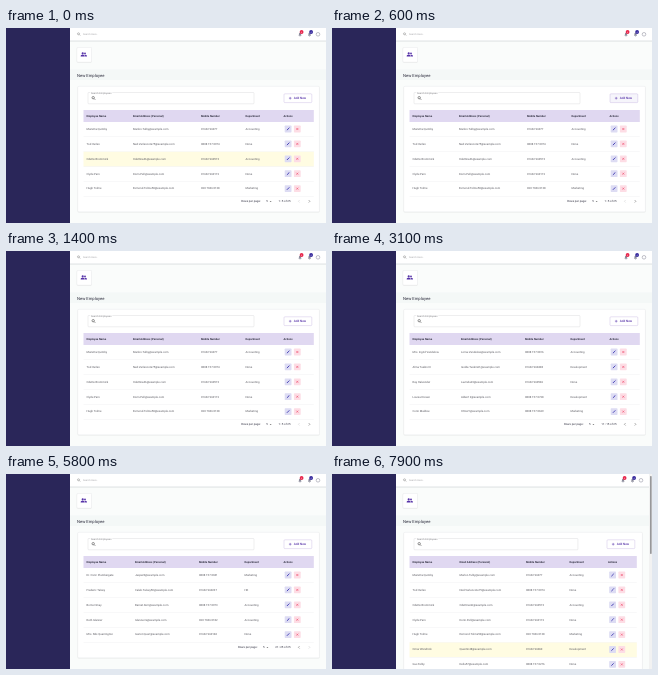
These frames come from a looping animation (320x195 px, 8000 ms). An HTML page:

```html
<!DOCTYPE html>
<html lang="en">
<head>
<meta charset="utf-8">
<title>Employee list</title>
<style>
html, body { margin: 0; width: 100%; height: 100%; overflow: hidden; background: #fafcfb; }
svg { display: block; width: 100vw; height: 100vh; }
text { font-family: Roboto, Arial, sans-serif; text-rendering: geometricPrecision; white-space: pre; }
</style>
</head>
<body>
<svg id="stage" viewBox="0 0 320 195"></svg>
<script>
const LOOP = 8000, ROW_H = 14.9, TOP = 94;
const INK = '#55555c', DARK = '#29293a', PURPLE = '#5632a8', NAVY = '#2a2659';

// name | mailbox | phone | department
const people = `Marietta Quimby|Marlon.Tulby|01632 96077|Accounting
Tod Varlen|Ned.Varlencote75|0808 157 0974|None
Odette Brommick|Odettine46|01632 960573|Accounting
Clyde Parn|Dorin.Pell|01632 960172|None
Hugh Tolme|Esmond.Tolme50|020 7946 0138|Marketing
Omar Wendrick|Quentin48|01632 96060|Development
Gus Felby|Della57|0808 157 0276|None
Nora Quillam|Nora.Quillam8|01632 960418|Marketing
Miles Trandor|Trandor31|0808 157 0265|HR
Edna Corvish|Edna.Corvish|01632 960844|Accounting
Mrs. Ingrid Vandelow|Lorna.Vandelow|0808 157 0816|Accounting
Alma Tuskin III|Isolde.Tuskin61|01632 960408|Development
Ray Halvender|Lavinda23|01632 960506|None
Louisa Dreven|Alden12|0808 157 0728|Development
Corin Maldow|Ottis21|0808 157 0629|Marketing
Lou Ebb|Jolanda89|020 7946 0935|Development
Ivy Tarnel|Oliver.T60|0808 157 0143|Development
Rolf Wimberan|Leonie.Wimber48|0808 157 025|Development
Greta Moll DDS|Humbert.Moll322|020 7946 0176|None
Matilda Vong|Brinna21|0808 157 0181|Accounting
Dr. Osric Plumbergate|Jasper8|0808 157 0941|Marketing
Frederic Talsey|Caleb.Talsey50|01632 960237|HR
Bo Kerrimay|Barnet.Kerr|0808 157 0973|Accounting
Ruth Glanner|Glanner.G|020 7946 0182|Accounting
Mrs. Nils Quarrington|Garret.Quarr|01632 960160|None`
  .split('\n').map(line => {
    const [name, box, phone, dept] = line.split('|');
    return [name, box + '@example.com', phone, dept];
  });

// left edges of the columns on each page, then with the scrollbar
const columns = [
  [80.5, 127, 195, 239.5, 277.5],
  [80.5, 128, 194, 239, 277.5],
  [80.5, 129, 193, 238.5, 277.5],
  [80.5, 128, 192, 238, 277.5],
  [80.5, 129, 193, 238.5, 277.5],
];
const narrowColumns = [80.5, 127.5, 194, 237.5, 276];

const rect = (x, y, w, h, fill, more = '') =>
  `<rect x="${x}" y="${y}" width="${w}" height="${h}" fill="${fill}" ${more}/>`;
const circle = (x, y, r, fill, more = '') =>
  `<circle cx="${x}" cy="${y}" r="${r}" fill="${fill}" ${more}/>`;
const line = (d, color, width = 0.5) =>
  `<path d="${d}" fill="none" stroke="${color}" stroke-width="${width}"/>`;
const shape = (d, fill) => `<path d="${d}" fill="${fill}"/>`;
const text = (x, y, str, size = 2.8, fill = INK, more = '') =>
  `<text x="${x}" y="${y}" font-size="${size}" fill="${fill}" ${more}>${str}</text>`;
const at = (x, y, body) => `<g transform="translate(${x} ${y})">${body}</g>`;
const shadowed = (x, y, w, h, r) =>
  rect(x - 0.5, y - 0.2, w + 1, h + 1.1, '#000', `rx="${r + 0.4}" opacity=".05"`) +
  rect(x, y, w, h, '#fff', `rx="${r}" stroke="#e6e8ea" stroke-width=".3"`);
const lens = (x, y, r, color) =>
  circle(x, y, r, 'none', `stroke="${color}" stroke-width="${r * 0.4}"`) +
  line(`M${x + r * 0.7} ${y + r * 0.7}l${r} ${r}`, color, r * 0.45);

// rises from 0 to 1 in n steps of 100 ms, the first one at start
const ramp = (t, start, n) => Math.min(1, Math.max(0, Math.floor((t - start) / 100) + 1) / n);

function bell(x, color) {
  return at(x, 6.6, shape('M-1.6 1.2L-1.1 .5V-.6a1.1 1.2 0 0 1 2.2 0V.5L1.6 1.2Z', '#8c8c9c') +
    circle(0, 1.7, 0.4, '#8c8c9c') + circle(1.6, -2.6, 1.9, color) +
    text(1.6, -1.9, '4', 2, '#fff', 'text-anchor="middle"'));
}

function chrome(shift) {
  return rect(64, 13, 256, 182, '#fafcfb') + rect(64, 41.5, 256, 10.5, '#f4f8f7') +
    rect(64, 12.3, 256, 1.2, '#dcdfe0') + rect(64, 0, 256, 12.4, '#fff') +
    lens(72.5, 5.8, 1, '#666') + text(77, 7, 'Search Here..', 2.5, '#a4a4a8') +
    bell(294 - shift, '#e8254b') + bell(303.5 - shift, '#34279c') +
    circle(312 - shift, 6.3, 1.8, 'none', 'stroke="#77778a" stroke-width=".45"') +
    rect(0, 0, 64, 195, NAVY) +
    shadowed(71, 19.5, 14.5, 14.5, 1) +
    at(77.7, 26.5, circle(-1, -1.1, 1.05, PURPLE) + circle(1.3, -1.1, 0.9, PURPLE) +
      shape('M-3 2V1.3q0-1.1 2-1.1t2 1.1V2Z', PURPLE) +
      shape('M1.4 2V1.2q0-.6-.4-.9q2.2 0 2.2 1V2Z', PURPLE)) +
    text(71, 48.6, 'New Employee', 4.17, DARK);
}

function toolbar(shift, hover) {
  return rect(82, 64.5, 166 - shift * 0.7, 11.3, 'none', 'rx=".8" stroke="#c4c4c8" stroke-width=".3"') +
    rect(84.3, 63.5, 22, 2, '#fff') + text(85, 65.5, 'Search Employees', 2.5, '#77777c') +
    lens(87.2, 69.7, 1.2, '#222') +
    at(278 - shift, 65.8,
      rect(0, 0, 27.8, 8.8, '#fff', 'rx=".9" stroke="#b9a9dc" stroke-width=".35"') +
      rect(0, 0, 27.8, 8.8, PURPLE, `rx=".9" opacity="${0.05 * hover}"`) +
      line('M4.9 4.4h2.6M6.2 3.1v2.6', PURPLE) +
      text(9.7, 5.5, 'Add New', 3.1, PURPLE, 'font-weight="500"'));
}

function tableHead(cols, width) {
  const labels = ['Employee Name', 'Email Address (Personal)', 'Mobile Number', 'Department', 'Actions'];
  return rect(77.5, 82, width, 12, '#e0d8f1') +
    labels.map((s, i) => text(cols[i], 88.9, s, 2.7, DARK, 'font-weight="700"')).join('');
}

function row(person, i, cols, width, glow) {
  const y = TOP + i * ROW_H, mid = y + 7;
  const x = cols[4] + 4.6;
  return rect(77.5, y, width, ROW_H - 0.3, '#fffce2', `opacity="${glow}"`) +
    rect(77.5, y + ROW_H - 0.3, width, 0.25, '#e3e3e5') +
    person.map((s, c) => text(cols[c], mid + 0.8, s)).join('') +
    at(x, mid, rect(-3.4, -3.4, 6.8, 6.8, '#dddcf3', 'rx=".7"') +
      line('M-1.2 1.2L.9-.9', '#3d37b2', 0.9) + line('M1.1-1.1l.4-.4', '#3d37b2', 0.9)) +
    at(x + 9.2, mid, rect(-3.4, -3.4, 6.8, 6.8, '#fddde5', 'rx=".7"') +
      line('M-1-1L1 1M1-1L-1 1', '#ed3157'));
}

function pager(page) {
  const range = `${page * 5 + 1}–${page * 5 + 5} of 25`;
  const dx = (9 - range.length) * 1.6;
  const arrow = (x, way, off) =>
    line(`M${x - way * 0.6} 172.1l${way * 1.2} 1.2l${-way * 1.2} 1.2`, off ? '#c2c2c4' : '#444', 0.45);
  return text(235.2 + dx, 174.3, 'Rows per page:', 2.85, DARK) + text(260.2 + dx, 174.3, '5', 2.8, DARK) +
    shape(`M${263.7 + dx} 172.9h1.9l-.95 1Z`, '#666') +
    text(284.5, 174.3, range, 2.8, DARK, 'text-anchor="end"') +
    arrow(293, -1, page === 0) + arrow(303.3, 1, page === 4);
}

function menu(opacity) {
  return `<g opacity="${opacity}">` + shadowed(253, 168.8, 11.4, 24.8, 0.7) +
    rect(253, 170, 11.4, 7.2, '#dedee4') +
    ['5', '10', '25'].map((s, i) =>
      text(256.6, 174.4 + i * 7.3, s, 2.9, DARK)).join('') + '</g>';
}

function scene(t) {
  const long = t >= 7700, narrow = t >= 7800;
  const page = long ? 0 : [2300, 3100, 4800, 5800].filter(start => t >= start).length;
  const shift = narrow ? 3 : 0, width = 230.3 - shift;
  const cols = narrow ? narrowColumns : columns[page];
  const pass = t >= 1300 && t < 1400 ? 0.35 : 0;
  const glow = [
    0,
    ramp(t, 800, 4) - ramp(t, 1300, 2),
    1 - ramp(t, 300, 4) + pass,
    pass,
    pass,
    ramp(t, 7700, 3),
  ];
  const addHover = ramp(t, 300, 4) - ramp(t, 800, 4);
  const menuOpacity = t < 6900 ? 0 : t < 7000 ? 0.85 : 1 - ramp(t, 7700, 3);
  const shown = people.slice(page * 5, page * 5 + (long ? 10 : 5));
  return chrome(shift) +
    shadowed(71.8, 58.3, 241.6 - shift, long ? 200 : 125.5, 1.2) +
    toolbar(shift, addHover) + tableHead(cols, width) +
    shown.map((p, i) => row(p, i, cols, width, glow[i] || 0)).join('') +
    (long ? '' : pager(page)) +
    (menuOpacity > 0 ? menu(menuOpacity) : '') +
    (narrow ? rect(317, 0, 3, 195, '#f2f2f2') + rect(318.1, 2, 1.5, 78, '#8d8d90', 'rx=".7"') : '');
}

const stage = document.getElementById('stage');
const began = performance.now();
let last = '';
function draw() {
  const next = scene((performance.now() - began) % LOOP);
  if (next !== last) stage.innerHTML = last = next;
  requestAnimationFrame(draw);
}
draw();
</script>
</body>
</html>
```
